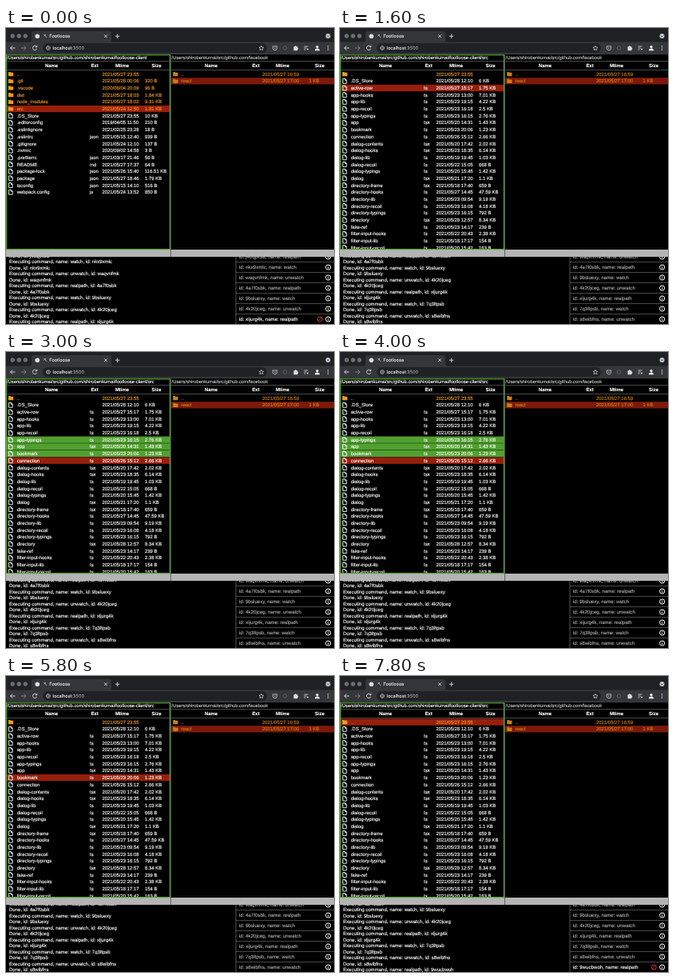
An HTML page for the animation above (8 s loop, 411 px wide and 370 px high).

```html
<!DOCTYPE html>
<html lang="en">
<head>
<meta charset="utf-8">
<title>Footloose</title>
<style>
html, body { margin: 0; width: 100%; height: 100%; overflow: hidden; background: #000; }
svg { display: block; width: 411px; height: 370px; }
text {
  font-family: "Liberation Sans", Arial, sans-serif; font-size: 5.95px; color: #fff;
  fill: currentColor; stroke: currentColor; stroke-width: .14px;
  white-space: pre; text-rendering: geometricPrecision;
}
.ui { font-family: Inter, sans-serif; font-size: 5.6px; color: #e4e5e7; }
.path { font-size: 5.8px; }
.head { font-weight: bold; text-anchor: middle; }
.log { font-size: 6.05px; }
.job { font-size: 6.15px; }
</style>
</head>
<body>
<svg viewBox="0 0 411 370">
  <g id="browser"></g>
  <g id="left"></g>
  <g id="right"></g>
  <g id="console"></g>
</svg>
<script>
const LOOP = 8000, ROW = 8.68, FIRST_ROW = 57.6;
const ORANGE = '#f29a1f', RED = '#961f0c', GREEN = '#50a02f', RULE = '#777', CHROME = '#dadce0';
const HOME = '/Users/shirobenkumai/src/github.com/';
const PROJECT = HOME + 'shirobenkumai/footloose-client';

const parse = source => source.trim().split('\n').map(line => {
  const [name, ext, date, size] = line.split('|');
  return { name: name.replace(/\/$/, ''), dir: name.endsWith('/') || name === '..', ext, date, size };
});

const projectFiles = parse(`
..||2021/05/27 23:55|
.git/||2021/05/28 00:06|320 B
.vscode/||2020/06/04 20:09|96 B
dist/||2021/05/27 18:03|1.84 KB
node_modules/||2021/05/27 18:02|9.31 KB
src/||2021/05/24 12:50|1.81 KB
.DS_Store||2021/05/27 23:55|10 KB
.editorconfig||2019/04/05 11:50|210 B
.eslintignore||2021/02/25 23:28|18 B
.eslintrc|json|2021/05/15 12:40|939 B
.gitignore||2021/05/24 12:10|137 B
.nvmrc||2020/09/02 14:58|3 B
.prettierrc|json|2021/03/17 21:46|56 B
README|md|2021/05/27 17:37|64 B
package-lock|json|2021/05/26 15:40|116.51 KB
package|json|2021/05/27 18:46|1.79 KB
tsconfig|json|2021/05/15 14:10|516 B
webpack.config|js|2021/05/24 13:52|850 B`);

const srcFiles = parse(`
..||2021/05/27 23:55|
.DS_Store||2021/05/28 12:10|6 KB
active-row|ts|2021/05/27 15:17|1.75 KB
app-hooks|ts|2021/05/23 13:00|7.01 KB
app-lib|ts|2021/05/23 19:15|4.22 KB
app-recoil|ts|2021/05/23 16:18|2.5 KB
app-typings|ts|2021/05/23 16:15|2.76 KB
app|tsx|2021/05/20 14:31|1.43 KB
bookmark|ts|2021/05/23 20:06|1.23 KB
connection|ts|2021/05/26 15:12|2.66 KB
dialog-contents|tsx|2021/05/20 17:42|2.02 KB
dialog-hooks|tsx|2021/05/23 18:35|6.14 KB
dialog-lib|ts|2021/05/19 19:45|1.03 KB
dialog-recoil|ts|2021/05/22 15:05|668 B
dialog-typings|ts|2021/05/20 15:45|1.42 KB
dialog|tsx|2021/05/21 17:20|1.1 KB
directory-frame|tsx|2021/05/18 17:40|659 B
directory-hooks|ts|2021/05/27 14:45|47.59 KB
directory-lib|ts|2021/05/23 09:54|9.19 KB
directory-recoil|ts|2021/05/23 16:08|4.18 KB
directory-typings|ts|2021/05/23 16:15|792 B
directory|tsx|2021/05/28 12:57|8.34 KB
fake-ref|ts|2021/05/23 14:17|239 B
filter-input-hooks|ts|2021/05/22 20:43|2.38 KB
filter-input-lib|ts|2021/05/18 17:17|154 B
filter-input-recoil|ts|2021/05/20 15:42|163 B`);

const repoFiles = parse(`
..||2021/05/27 16:59|
react/||2021/05/27 17:00|1 KB`);

const jobs = ['j40qyk3a realpath', 'nkx9xmlc watch', 'waqvnfmk unwatch', '4a7f0sbk realpath',
  '9bsluexy watch', '4k20jceg unwatch', 'xijurg4k realpath', '7q3ltpsb watch',
  's8wibfns unwatch', '9wucbwoh realpath'].map(job => job.split(' '));

// [start ms, cursor row, first marked row, marked rows]
const cursorSteps = [
  [1000, 0], [1600, 2], [1800, 4], [2000, 5], [2200, 6],
  [2400, 7, 6, 1], [2600, 8, 6, 2], [2800, 9, 6, 3],
  [4200, 8, 6, 3], [4400, 7, 6, 3], [4600, 6, 6, 3],
  [4800, 7, 7, 2], [5000, 8, 8, 1], [5200, 9],
  [5800, 8], [6000, 7], [6200, 5], [6400, 4], [6600, 3],
  [7000, 2], [7200, 1], [7400, 0]
];

const $ = id => document.getElementById(id);
const text = (x, y, s, attrs = '') => s ? `<text x="${x}" y="${y}" ${attrs}>${s}</text>` : '';
const rect = (x, y, w, h, fill, attrs = '') => `<rect x="${x}" y="${y}" width="${w}" height="${h}" fill="${fill}" ${attrs}/>`;
const circle = (x, y, r, fill, attrs = '') => `<circle cx="${x}" cy="${y}" r="${r}" fill="${fill}" ${attrs}/>`;
const ring = (x, y, r, color, width) => circle(x, y, r, 'none', `stroke="${color}" stroke-width="${width}"`);
const shape = (d, fill) => `<path d="${d}" fill="${fill}"/>`;
const line = (d, color = CHROME, width = 0.9) => `<path d="${d}" fill="none" stroke="${color}" stroke-width="${width}"/>`;

const folderIcon = (x, y) => shape(`M${x} ${y - 2.6}h2.4l.8.8h3v4.4h-6.2z`, ORANGE);
const fileIcon = (x, y) => line(`M${x + .6} ${y - 3}h2.8l1.8 1.8v4.2h-4.6zM${x + 3.2} ${y - 3}v2h2`, '#fff', 0.9);

function drawBrowser() {
  const lights = [0, 1, 2].map(i => circle(8.3 + i * 8, 10, 2.7, '#6b6d70')).join('');
  const dots = [-2.2, 0, 2.2].map(d => circle(403.5, 25 + d, 0.75, CHROME)).join('');
  $('browser').innerHTML =
    rect(0, 0, 411, 18, '#202124') +
    shape('M29 18q3 0 3-3v-8q0-3 3-3h94q3 0 3 3v8q0 3 3 3z', '#35363a') +
    lights + circle(39.3, 10.2, 2.8, CHROME) +
    line('M47.5 8l3.4 3.8M47.6 10l2.6-2', '#c4c7cb') +
    text(54.3, 12.2, 'Footloose', 'class="ui"') +
    line('M123.2 8.4l3.6 3.6m0-3.6l-3.6 3.6') + line('M136.9 10.2h5.4m-2.7-2.7v5.4') +
    circle(403.5, 10, 3, '#c4c7cb') + line('M402 9.4l1.5 1.5 1.5-1.5', '#202124', 0.8) +
    rect(0, 17.5, 411, 16, '#35363a') +
    line('M11.5 25h-6m2.7-2.7L5.5 25l2.7 2.7') +
    line('M19 25h6m-2.7-2.7L25 25l-2.7 2.7', '#85878b') +
    line('M38.3 23.2a2.7 2.7 0 1 0 .4 2.6M38.8 21.8v2h-2') +
    rect(46, 19, 281, 12, '#202124', 'rx="6"') +
    ring(53, 25, 2.4, '#b4b7bb', 0.8) + line('M50.6 25h4.8M53 22.6v4.8', '#b4b7bb', 0.6) +
    text(58.6, 27.1, 'localhost<tspan style="color:#9aa0a6">:3500</tspan>', 'class="ui"') +
    line('M320 22.2l.9 1.9 2 .2-1.5 1.4.4 2-1.8-1-1.8 1 .4-2-1.5-1.4 2-.2z', CHROME, 0.7) +
    line('M334.3 22.8h5.4v2.3a2.7 2.7 0 0 1-5.4 0zM335.6 24.4l1.4 1.3 1.4-1.3', CHROME, 0.7) +
    ring(349.5, 25, 2.3, '#5c5e62', 0.9) +
    shape('M360.5 23.2h1.4a1 1 0 0 1 2 0h1.5v1.5a1 1 0 0 1 0 2v1.5h-4.9z', CHROME) +
    line('M373.5 23h5M373.5 25h3M373.5 27h2', CHROME, 0.8) + circle(378, 26.5, 1.1, CHROME) +
    circle(390, 23.5, 1.6, '#fff') + shape('M387 28.2q0-2.6 3-2.6t3 2.6z', '#fff') + dots;
}

function fileRow(file, index, pane, fill) {
  const y = FIRST_ROW + index * ROW;
  const color = file.dir ? `style="color:${ORANGE}"` : '';
  const icon = file.dir ? folderIcon : fileIcon;
  return (fill ? rect(pane.x, y - ROW / 2 + 0.2, pane.width, ROW - 0.4, fill) : '') +
    icon(pane.icon, y) +
    [file.name, file.ext, file.date, file.size].map((s, i) => text(pane.columns[i], y + 2.1, s, color)).join('');
}

function paneMarkup(pane, path, files, fillAt) {
  const heads = ['Name', 'Ext', 'Mtime', 'Size'].map((s, i) => text(pane.heads[i], 49.2, s, 'class="head"')).join('');
  const rows = files.map((file, i) => fileRow(file, i, pane, fillAt(i))).join('');
  return rect(pane.x, 33.5, pane.width, 252.5, '#000') +
    text(pane.x + 1, 39.4, path, `class="path" style="color:${pane.pathColor}"`) +
    rect(pane.x, 41.4, pane.width, 0.6, RULE) + heads +
    rect(pane.x, 52.2, pane.width, 0.6, RULE) +
    `<g opacity="${pane.opacity}">${rows}</g>` +
    rect(pane.x, 277, pane.width, 9, '#b4b4b4');
}

const leftPane = {
  x: 0, width: 206, icon: 3, opacity: 1, pathColor: '#fff',
  columns: [13.7, 105, 120.4, 174], heads: [57, 111, 145.5, 188.5]
};
const rightPane = {
  x: 206.6, width: 204.4, icon: 209.3, opacity: 0.83, pathColor: '#c4c4c4',
  columns: [219.5, 308, 321, 379.5], heads: [257, 313, 346.5, 393]
};

function drawLeft(inSrc, cursor, markStart, markCount) {
  const fillAt = i => i === cursor ? RED : i >= markStart && i < markStart + markCount ? GREEN : '';
  $('left').innerHTML =
    paneMarkup(leftPane, PROJECT + (inSrc ? '/src' : ''), inSrc ? srcFiles : projectFiles, fillAt) +
    rect(0.6, 33.8, 204.8, 242.7, 'none', `stroke="${GREEN}" stroke-width="1.2"`);
}

function drawRight() {
  $('right').innerHTML =
    paneMarkup(rightPane, HOME + 'facebook', repoFiles, i => i === 1 ? RED : '') +
    rect(206, 33.5, 0.6, 252.5, RULE);
}

function drawConsole(count, running) {
  const shown = jobs.slice(0, count);
  const log = shown.flatMap(([id, name]) =>
    [`Executing command, name: ${name}, id: ${id}`, `Done, id: ${id}`]);
  if (running) log.pop();
  const logMarkup = log.slice(-12).map((s, i) => text(4, 286.9 + i * 7.5, s, 'class="log"')).join('');

  const jobMarkup = shown.slice(-7).map(([id, name], i) => {
    const y = 286 + i * 13, active = running && i === 6;
    const stop = ring(393.3, y, 3, '#d8331c', 1) + line(`M391.2 ${y + 2.1}l4.2-4.2`, '#d8331c');
    return text(292, y + 2.1, `id: ${id}, name: ${name}`, `class="job" style="color:${active ? '#fff' : '#a8a8a8'}"`) +
      (active ? stop : '') + ring(403.7, y, 3.1, '#fff', 1) +
      rect(403.2, y - 0.4, 1, 2.1, '#fff') + rect(403.2, y - 1.7, 1, 0.8, '#fff') +
      rect(288, y + 6.2, 123, 0.6, RULE);
  }).join('');

  $('console').innerHTML =
    '<clipPath id="below"><rect y="286" width="411" height="84"/></clipPath>' +
    `<g clip-path="url(#below)">${rect(0, 286, 411, 84, '#000')}${logMarkup}${jobMarkup}${rect(287.7, 286, 0.7, 84, RULE)}</g>`;
}

let shownState = '';

function render(time) {
  const t = time % LOOP, inSrc = t >= 1000;
  const step = cursorSteps.filter(s => s[0] <= t).pop() || [0, 5];
  const [, cursor, markStart = 0, markCount = 0] = step;
  const jobCount = !inSrc ? 7 : t < 7800 ? 9 : 10;
  const state = [step, jobCount].join();
  if (state === shownState) return;
  shownState = state;
  drawLeft(inSrc, cursor, markStart, markCount);
  drawConsole(jobCount, jobCount !== 9);
}

function tick() {
  render(performance.now());
  requestAnimationFrame(tick);
}

drawBrowser();
drawRight();
tick();
</script>
</body>
</html>
```
